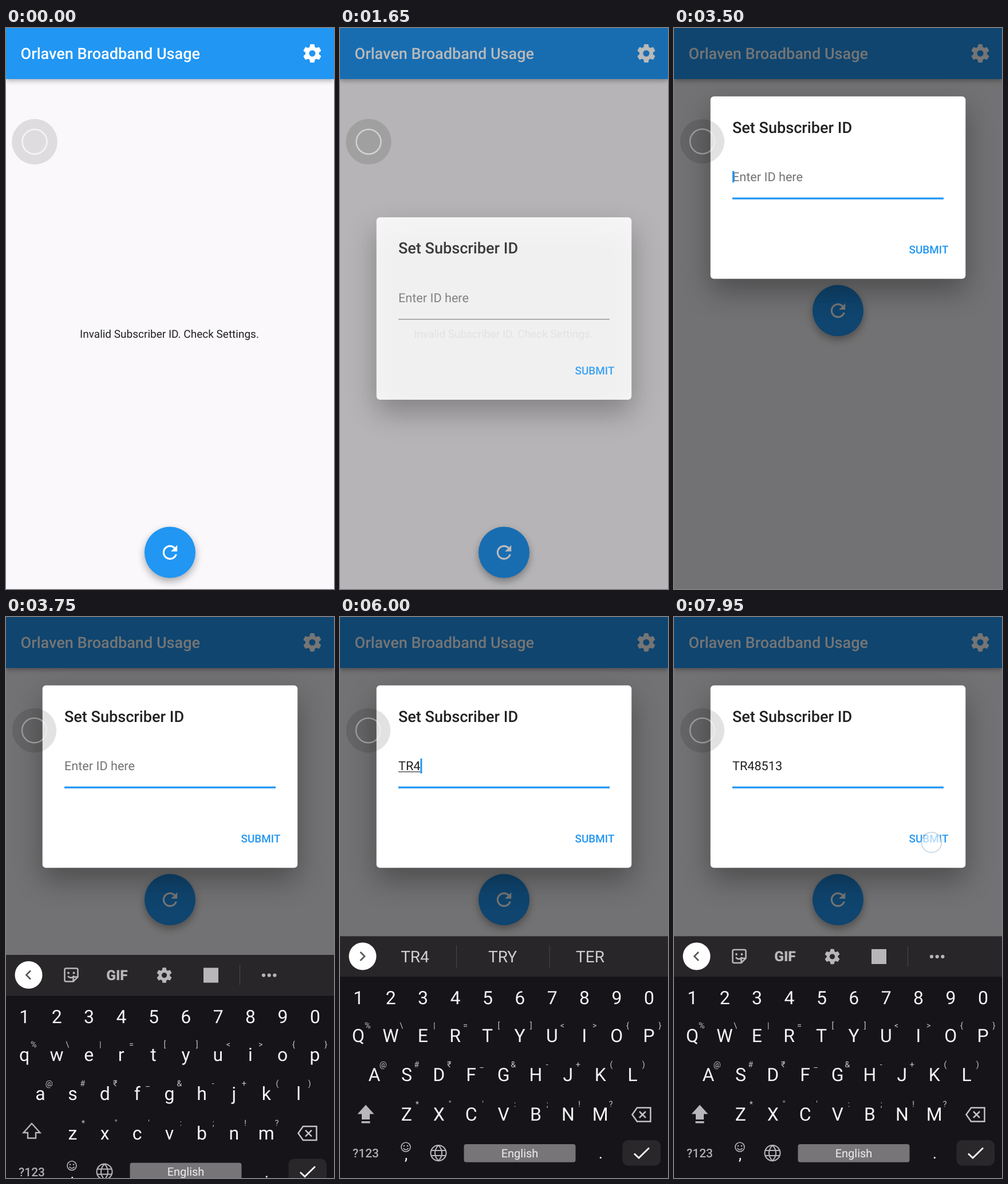
Animation, 573 px wide and 978 px high, one loop 8000 ms. Source, as an HTML page with a canvas:

```html
<!DOCTYPE html>
<html lang="en">
<head>
<meta charset="utf-8">
<title>Broadband usage app</title>
<style>
html, body { margin: 0; width: 100%; height: 100%; overflow: hidden; background: #faf8fb; }
canvas { display: block; }
</style>
</head>
<body>
<canvas id="stage" width="573" height="978"></canvas>
<script>
const ctx = document.getElementById('stage').getContext('2d');
ctx.textRendering = 'geometricPrecision';
const W = 573, H = 978, LOOP = 8000;
const BLUE = '#2196f3', BG = '#faf8fb', ICON = '#b8b6b9';
const KEYBOARD_TOP = 556.5, KEYBOARD_H = H - KEYBOARD_TOP, PITCH = 56.4;
const DIALOG_IN = 1550, FOCUS = 2500, INSET = 3050, KEYBOARD_IN = 3550;

// Time at which each text appears, with the suggestions shown for it.
const typed = [
  [5250, 'T', ['T', 'THE', 'TO']],
  [5500, 'TR', ['TR', 'TRY', 'TRUE']],
  [5850, 'TR4', ['TR4', 'TRY', 'TER']],
  [6250, 'TR48'], [6550, 'TR485'], [7050, 'TR4851'], [7200, 'TR48513']
];
const cursorResets = [2550, INSET, 3950, ...typed.map(step => step[0])];

// Touches: x, y, press time, release time.
const digitX = d => 32.3 + PITCH * ((d + 9) % 10);
const touches = [
  [539, 26, 1350, 1480], [190, 470, 2250, 2400],
  [45, 866, 4150, 4220], [45, 866, 4350, 4420],
  [257, 730, 5200, 5260], [201, 730, 5450, 5510], [digitX(4), 663, 5780, 5840],
  [digitX(8), 663, 6150, 6250], [digitX(5), 663, 6480, 6560],
  [digitX(1), 663, 7000, 7060], [digitX(3), 663, 7150, 7220],
  [450, 393, 7950, 8100]
];

const letterRows = [
  ['QWERTYUIOP', '%\\|=[]<>{}', 32, 741],
  ['ASDFGHJKL', '@#₹_&-+()', 60, 809],
  ['ZXCVBNM', '*"\':;!?', 116.4, 878]
];

const clamp = v => Math.max(0, Math.min(1, v));
const ramp = (t, start, length) => clamp((t - start) / length);
const easeOut = p => 1 - (1 - p) ** 3;

function text(str, x, y, size, color, weight = 400, align = 'left') {
  ctx.font = `${weight} ${size}px Roboto, sans-serif`;
  ctx.textAlign = align;
  ctx.fillStyle = color;
  ctx.fillText(str, x, y);
}

function rect(x, y, w, h, color, radius = 0) {
  ctx.fillStyle = color;
  ctx.beginPath();
  ctx.roundRect(x, y, w, h, radius);
  ctx.fill();
}

function disc(x, y, r, color) {
  ctx.fillStyle = color;
  ctx.beginPath();
  ctx.arc(x, y, r, 0, 7);
  ctx.fill();
}

function ring(x, y, r, color, width) {
  ctx.strokeStyle = color;
  ctx.lineWidth = width;
  ctx.beginPath();
  ctx.arc(x, y, r, 0, 2 * Math.PI);
  ctx.stroke();
}

function line(path, color, width) {
  ctx.strokeStyle = color;
  ctx.lineWidth = width;
  ctx.stroke(new Path2D(path));
}

function withShadow(color, blur, dy, draw) {
  ctx.save();
  ctx.shadowColor = color;
  ctx.shadowBlur = blur;
  ctx.shadowOffsetY = dy;
  draw();
  ctx.restore();
}

function gear(x, y, scale, color) {
  const tooth = [[7.5, -22.5], [9.8, -14.5], [10.2, -11], [10.2, 11], [9.8, 14.5], [7.5, 22.5]];
  ctx.save();
  ctx.translate(x, y);
  ctx.scale(scale, scale);
  ctx.fillStyle = color;
  ctx.beginPath();
  for (let k = 0; k < 6; k++) {
    for (const [r, deg] of tooth) {
      const a = (deg + 60 * k) * Math.PI / 180;
      ctx.lineTo(r * Math.sin(a), -r * Math.cos(a));
    }
  }
  ctx.closePath();
  ctx.moveTo(3.5, 0);
  ctx.arc(0, 0, 3.5, 0, 7);
  ctx.fill('evenodd');
  ctx.restore();
}

const refreshIcon = new Path2D('M17.65 6.35C16.2 4.9 14.21 4 12 4c-4.42 0-7.99 3.58-7.99 8s3.57 8 7.99 8c3.73 0 6.84-2.55 7.73-6h-2.08c-.82 2.33-3.04 4-5.65 4-3.31 0-6-2.69-6-6s2.69-6 6-6c1.66 0 3.14.69 4.22 1.78L13 11h7V4z');

function drawApp(t) {
  const bottom = t < INSET ? H : KEYBOARD_TOP;
  const buttonY = bottom - 63.8;
  rect(0, 0, W, H, BG);
  text('Invalid Subscriber ID. Check Settings.', 285.5, (89 + bottom) / 2 + 6.5, 19, '#212121', 400, 'center');
  withShadow('rgba(0,0,0,.3)', 8, 3, () => rect(0, 0, W, 89, BLUE));
  text('Orlaven Broadband Usage', 25.5, 53.7, 27.06, '#fff', 500);
  gear(535, 44.3, 1.592, '#fff');
  withShadow('rgba(0,0,0,.33)', 14, 6, () => disc(286.5, buttonY, 44.6, BLUE));
  ctx.save();
  ctx.translate(286.5 - 19.1, buttonY - 19.1);
  ctx.scale(1.592, 1.592);
  ctx.fillStyle = '#fff';
  ctx.fill(refreshIcon);
  ctx.restore();
}

function drawDialog(t, step) {
  const shown = ramp(t, DIALOG_IN, 200);
  if (!shown) return;
  rect(0, 0, W, H, `rgba(0,0,0,${0.54 * shown})`);
  ctx.save();
  ctx.globalAlpha = easeOut(shown);
  ctx.translate(0, 330 - 210.75 * easeOut(ramp(t, INSET, 150)));
  withShadow('rgba(0,0,0,.32)', 50, 22, () => rect(63.7, 0, 445.6, 318, '#fff', 6));
  text('Set Subscriber ID', 102, 63.3, 27.06, '#212121', 500);
  text('SUBMIT', 410.5, 273.5, 18.95, BLUE, 500);

  const focus = ramp(t, FOCUS, 200);
  if (focus < 1) rect(102, 177, 369, 1.6, 'rgba(0,0,0,.42)');
  ctx.save();
  ctx.globalAlpha *= focus;
  rect(102, 176.3, 369, 3.1, BLUE);
  ctx.restore();

  let width = 0;
  if (step) {
    text(step[1], 102, 148, 21.65, '#212121');
    width = ctx.measureText(step[1]).width;
    if (step[2]) rect(102, 150, width, 1.3, '#333');
  } else {
    text('Enter ID here', 102, 148, 21.65, '#727272');
  }
  const reset = cursorResets.findLast(time => time <= t);
  if (reset && (t - reset) % 1000 < 500) {
    if (step) rect(102 + width, 127.5, 3, 26, BLUE);
    else rect(102, 130, 3.2, 20, BLUE);
  }
  ctx.restore();
}

function drawToolbar(suggestions) {
  rect(0, KEYBOARD_TOP, W, 70.5, '#282629');
  disc(39.5, 591.5, 24, '#fff');
  if (suggestions) {
    line('M35.5 584L43 591.5L35.5 599', '#555', 2.6);
    suggestions.forEach((word, i) => text(word, 131 + 153 * i, 602, 28, '#d0ced1', 400, 'center'));
    rect(203, 572, 1, 39, '#47454a');
    rect(365.5, 572, 1, 39, '#47454a');
    return;
  }
  line('M43 584L35.5 591.5L43 599', '#555', 2.6);
  line('M105 580H123Q125.5 580 125.5 582.5V595L117.5 603H105Q102.5 603 102.5 600.5V582.5Q102.5 580 105 580ZM125 595H117.5V602M108 593.5Q113.5 599.5 119 593', ICON, 2.6);
  disc(109, 588, 1.9, ICON);
  disc(118.5, 588, 1.9, ICON);
  text('GIF', 194, 600, 24.5, ICON, 900, 'center');
  gear(276.5, 592, 1.32, ICON);
  rect(345, 579, 26, 26, ICON);
  rect(408, 574, 1, 35, '#4a484c');
  for (const x of [450, 459.7, 469.4]) disc(x, 592, 3.1, ICON);
}

function drawKeys(t) {
  const upper = t >= 4200, capsLock = t >= 4400;
  rect(0, 627, W, H - 627, '#161418');
  for (let d = 0; d < 10; d++) {
    text(d, digitX(d), 675, 32, '#f4f4f4', 400, 'center');
  }
  for (const [letters, symbols, x, y] of letterRows) {
    [...letters].forEach((letter, i) => {
      text(upper ? letter : letter.toLowerCase(), x + PITCH * i, y, 32, '#f4f4f4', 400, 'center');
      text(symbols[i], x + 21.7 + PITCH * i, y - 24, 14.5, '#c4c2c5', 400, 'right');
    });
  }

  const arrow = 'M45 850.5L59.5 866.5H52V876H38V866.5H30.5Z';
  if (upper) {
    ctx.fillStyle = ICON;
    ctx.fill(new Path2D(arrow));
  } else {
    line(arrow, ICON, 2.4);
  }
  if (capsLock) rect(37.5, 879, 15, 3.5, ICON);
  line('M519 855.5H542.5V879.5H519L510.5 867.5ZM523 862L534 873M534 862L523 873', '#c4c2c5', 2.5);

  text('?123', 45, 942, 21, '#b0aeb1', 500, 'center');
  ring(115, 924, 8, ICON, 1.6);
  disc(112, 922, 1.3, ICON);
  disc(118, 922, 1.3, ICON);
  line('M110.5 926Q115 931.5 119.5 926', ICON, 1.6);
  text(',', 115.5, 946, 28, '#f4f4f4', 400, 'center');
  ring(172, 934.5, 13.5, ICON, 2);
  line('M159.5 930H184.5M159.5 939H184.5M172 921C164 929 164 940 172 948C180 940 180 929 172 921', ICON, 2);
  rect(216.5, 919, 195, 31.5, '#777578', 4);
  text('English', 314, 941.7, 20, '#eee', 400, 'center');
  text('.', 455.5, 944, 28, '#f4f4f4', 400, 'center');
  rect(493.5, 912, 66.5, 44.5, '#29272a', 10);
  line('M514 935.5L522 943L540 925.5', '#fff', 2.8);
}

function drawKeyboard(t, step) {
  const shown = easeOut(ramp(t, KEYBOARD_IN, 350));
  if (!shown) return;
  ctx.save();
  ctx.translate(0, KEYBOARD_H * (1 - shown));
  drawToolbar(step && step[2]);
  drawKeys(t);
  ctx.restore();
}

function drawFloatingBall(t) {
  const small = t >= INSET;
  const x = small ? 49.5 : 50, y = small ? 197.7 : 198.3;
  const ringAlpha = 0.72 - 0.37 * ramp(t, DIALOG_IN, 200);
  disc(x, y, small ? 38.7 : 39.8, 'rgba(0,0,0,.115)');
  ring(x, y, 21.5, `rgba(255,255,255,${ringAlpha})`, 2.5);
}

function drawTouches(t) {
  for (const [x, y, down, up] of touches) {
    if (t < down) continue;
    const alpha = 1 - ramp(t, up, 150);
    if (!alpha) continue;
    ctx.save();
    ctx.globalAlpha = alpha;
    withShadow('rgba(255,255,255,.6)', 10, 0, () => disc(x, y, 16.5, 'rgba(255,255,255,.52)'));
    ring(x, y, 17.5, 'rgba(140,170,200,.45)', 1.8);
    ctx.restore();
  }
}

function frame() {
  const t = performance.now() % LOOP;
  const step = typed.findLast(([time]) => time <= t);
  drawApp(t);
  drawDialog(t, step);
  drawKeyboard(t, step);
  drawFloatingBall(t);
  drawTouches(t);
  requestAnimationFrame(frame);
}
frame();
</script>
</body>
</html>
```
